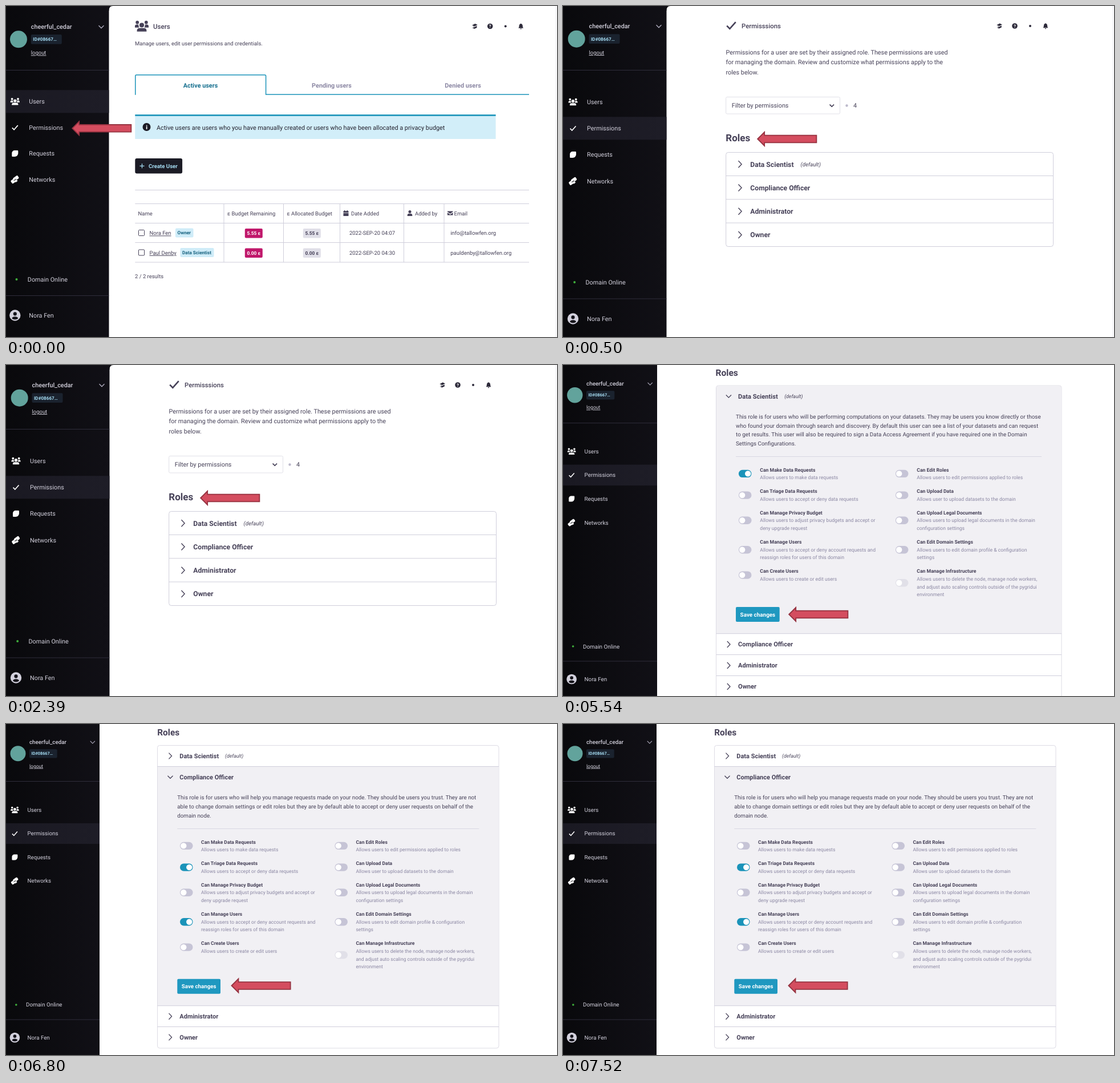
Animation of 966 by 580 pixels, one loop 8000 ms. Source, as an HTML page:

```html
<!DOCTYPE html>
<html lang="en">
<head>
<meta charset="utf-8">
<title>User permissions</title>
<style>
  html, body { margin: 0; width: 100%; height: 100%; overflow: hidden; background: #fff; }
  svg { display: block; width: 966px; height: 580px; }
  text { font-family: Roboto, sans-serif; text-rendering: geometricPrecision; white-space: pre; }
  .scene { visibility: hidden; animation: 8s step-end infinite; }
  #users { animation-name: users; }
  #roles { animation-name: roles; }
  #scientist { animation-name: scientist; }
  #officer { animation-name: officer; }
  @keyframes users { 0% { visibility: visible } 6.25%, 100% { visibility: hidden } }
  @keyframes roles { 0% { visibility: hidden } 6.25% { visibility: visible } 45.625%, 100% { visibility: hidden } }
  @keyframes scientist { 0% { visibility: hidden } 45.625% { visibility: visible } 85%, 100% { visibility: hidden } }
  @keyframes officer { 0% { visibility: hidden } 85%, 100% { visibility: visible } }
</style>
</head>
<body>
<svg viewBox="0 0 966 580">
  <defs>
    <linearGradient id="side"><stop stop-color="#09090c"/><stop offset="1" stop-color="#111016"/></linearGradient>
    <linearGradient id="row"><stop stop-color="#1a1922"/><stop offset="1" stop-color="#1e1d27"/></linearGradient>
  </defs>
  <g class="scene" id="users"></g>
  <g class="scene" id="roles"></g>
  <g class="scene" id="scientist"></g>
  <g class="scene" id="officer"></g>
</svg>
<script>
const INK = '#464158', DARK = '#2e2b3b', MUTED = '#8b87a3', LINE = '#cfcedb', BLUE = '#1a93b9', LIGHT = '#d3d1dd';
const PERSON = 'Nora Fen', HANDLE = 'cheerful_cedar';

// y is the middle of the capitals
const text = (x, y, size, str, { fill = INK, weight = 400, extra = '' } = {}) =>
  `<text x="${x}" y="${y + size * .355}" font-size="${size}" font-weight="${weight}" fill="${fill}" ${extra}>${str}</text>`;
const MID = 'text-anchor="middle"', UNDER = 'text-decoration="underline"', ITALIC = 'font-style="italic"';
const box = (x, y, w, h, fill, r = 0, extra = '') =>
  `<rect x="${x}" y="${y}" width="${w}" height="${h}" rx="${r}" fill="${fill}" ${extra}/>`;
const disc = (x, y, r, fill) => `<circle cx="${x}" cy="${y}" r="${r}" fill="${fill}"/>`;
const path = (d, stroke, width = 1) => `<path d="${d}" fill="none" stroke="${stroke}" stroke-width="${width}"/>`;
const hline = (x1, x2, y, stroke = LINE) => path(`M${x1} ${y}H${x2}`, stroke);
const at = (x, y, scale, body) => `<g transform="translate(${x} ${y}) scale(${scale})">${body}</g>`;

const shape = d => fill => `<path d="${d}" fill="${fill}"/>`;
const icons = {
  users: c => disc(0, -1.2, 2.7, c) + disc(-5.2, -4.4, 1.9, c) + disc(5.2, -4.4, 1.9, c) +
    shape('M-5.6 6.3V5A3 3 0 0 1-2.6 2.3H2.6A3 3 0 0 1 5.6 5V6.3ZM-8 1.6V0A2 2 0 0 1-6-1.8H-3.8Q-4.1.3-3 1.6ZM8 1.6V0A2 2 0 0 0 6-1.8H3.8Q4.1.3 3 1.6Z')(c),
  check: c => path('M-5 .4L-1.7 3.8L5-3.8', c, 1.7),
  leaf: shape('M-5.5 4.2V-.8A4.7 4.7 0 0 1-.8-5.5H4.2A1.3 1.3 0 0 1 5.5-4.2V-.5A6 6 0 0 1-.5 5.5H-4.2A1.3 1.3 0 0 1-5.5 4.2Z'),
  shake: c => `<g transform="rotate(-35)">${box(-8, -2.6, 7.5, 6.4, c, 1.8)}${box(-2.4, -4, 10, 6, c, 1.8)}${path('M-3 .4H2.2M0 3.2H4.5', '#0d0d11', 1)}${box(-2, 2, 4.5, 2.8, c, 1.2)}</g>`,
  cap: shape('M-4.6-1.8L.6-4.4L5-2.6L-.4.2ZM-4 .2L-.4 1.4L3.8-.8V2.4L-.6 4.4L-4.4 2.8L-1 2.6Z'),
  bell: shape('M-4.3 3.2C-3 2-3.2-.5-3-1.5C-2.6-3.6-1.2-4.2 0-4.8C1.2-4.2 2.6-3.6 3-1.5C3.2-.5 3 2 4.3 3.2ZM-1.3 3.9H1.3A1.3 1.3 0 0 1-1.3 3.9Z'),
  calendar: shape('M-4.5-1V-3.8H-3V-5H-1.6V-3.8H1.6V-5H3V-3.8H4.5V-1ZM-4.5-.3H4.5V5H-4.5Z'),
  person: c => disc(0, -2.4, 2.5, c) + shape('M-4.3 4.9V3.4A2.8 2.8 0 0 1-1.5.8H1.5A2.8 2.8 0 0 1 4.3 3.4V4.9Z')(c),
  mail: shape('M-4.8-3.6H4.8V-2.4L0 1.1L-4.8-2.4ZM-4.8-1.1L0 2.4L4.8-1.1V3.6H-4.8Z'),
};
const icon = (name, x, y, fill, scale = 1) => at(x, y, scale, icons[name](fill));
const chevron = (x, y, dir, scale = 1, stroke = INK, width = 1.4) =>
  at(x, y, scale, path(dir === 'down' ? 'M-5-2.5L0 2.5L5-2.5' : 'M-2.8-6L2.8 0L-2.8 6', stroke, width));
const arrow = (x, y) =>
  at(x, y, 1, '<path d="M1.2 0L13.2-12V-6.3H104.4V6.3H13.2V12Z" fill="#d44d5f" stroke="#963341" stroke-width="1.8"/>');

const NAV = [['users', 'Users'], ['check', 'Permissions'], ['leaf', 'Requests'], ['shake', 'Networks']];

function sidebar({ w, u, x, size, active, y }) {
  const [name, id, logout, rule, nav, step, online, rule2, foot] = y;
  const small = size * .875, left = x + 3.5;
  let s = box(0, 0, w, 580, 'url(#side)');
  s += disc(x - 18.3 * u, id, 15 * u, '#62a39c');
  s += text(left, name, size, HANDLE, { fill: LIGHT, weight: 500 });
  s += chevron(w - 13.5 * u, name + .5, 'down', .9 * u, '#b4b1c4');
  s += box(left, id - 8.4 * u, 54 * u, 16.8 * u, '#1a222e', 2);
  s += text(left + 3.5, id, size * .75, 'ID#08667…', { fill: '#a5dcf2', weight: 700 });
  s += text(left, logout, small, 'logout', { fill: LIGHT, extra: UNDER });
  s += hline(0, w, rule, '#2f2d3b');
  s += box(0, nav + active * step - 20 * u, w, 40 * u, 'url(#row)');
  NAV.forEach(([ico, label], i) => {
    const ny = nav + i * step;
    s += icon(ico, x - 24.5 * u, ny, '#fff', u) + text(x, ny, size, label, { fill: LIGHT });
  });
  s += disc(x - 21.8 * u, online, 2 * u, '#3fae3b') + text(x - 2.5, online, size, 'Domain Online', { fill: LIGHT });
  s += hline(0, w, rule2, '#2f2d3b');
  s += at(x - 24.5 * u, foot, u, disc(0, 0, 9.7, LIGHT) + disc(0, -2.6, 3.1, '#14131a') +
    shape('M-5.6 5.2Q-4.4 2.2 0 2.2T5.6 5.2Q3.4 7.6 0 7.6T-5.6 5.2Z')('#14131a'));
  return s + text(x, foot, size, PERSON, { fill: LIGHT });
}

const page = (w, rounded) => box(0, 0, 966, 580, '#fff') +
  (rounded ? shape(`M${w - 1} 0H${w + 7}Q${w} 0 ${w} 8H${w - 1}Z`)('#111016') + path('M964 0V580', '#eeedf2') : '');

const tools = (x, y) => icon('cap', x, y, DARK) + disc(x + 27, y, 4.8, DARK) +
  text(x + 27, y, 7.5, '?', { fill: '#fff', weight: 700, extra: MID }) +
  disc(x + 54, y, 2, DARK) + icon('bell', x + 81, y, DARK);

const tag = (x, y, w, label) => box(x, y - 8, w, 16, '#cfecf8', 2) +
  text(x + 3.6, y, 8.12, label, { fill: '#17627f', weight: 700 });
const pill = (x, y, label, bg, fill) => box(x - 15.5, y - 8, 31, 16.4, bg, 2) +
  text(x, y + .2, 8.4, label, { fill, weight: 700, extra: MID });

function usersScene() {
  const size = 10.83, s14 = 9.48, L = 226.3, R = 917;
  let s = page(180.5, true) + sidebar({
    w: 180.5, u: 1, x: 40.3, size: 10.8, active: 0,
    y: [36, 58.3, 82, 112.5, 167.3, 45.6, 479, 507.5, 542] });
  s += icon('users', 238, 35.3, INK, 1.5) + text(258, 36, 11.6, 'Users', { weight: 500 }) + tools(821.7, 35.5);
  s += text(226, 65.3, s14, 'Manage users, edit user permissions and credentials.');
  s += path(`M226.8 155.8V122.7Q226.8 120.7 228.8 120.7H453.6Q455.6 120.7 455.6 122.7V155H${R}`, BLUE, 1.5);
  ['Active', 'Pending', 'Denied'].forEach((t, i) =>
    s += text(341 + 230 * i, 139, size, t + ' users', { weight: 700, fill: i ? MUTED : '#17708f', extra: MID }));
  s += box(L, 190.2, 632.3, 42.8, '#d2eef9') + box(L, 190.2, 632.3, 2.6, BLUE);
  s += disc(246.5, 212, 7, '#1b1a24') + text(246.5, 212, 10, 'i', { fill: '#fff', weight: 900, extra: MID });
  s += text(264, 213, 10.85, 'Active users are users who you have manually created or users who have been allocated a privacy budget', { fill: '#23212d' });
  s += box(L, 267, 82.8, 26.5, '#1b1b25', 3) + path('M234.5 280.3H242.5M238.5 276.3V284.3', '#a5dcf2', 1.3);
  s += text(250, 280.5, 9.6, 'Create User', { fill: '#a5dcf2', weight: 700 });
  [322.5, 346.5, 380.5, 414.5, 449].forEach(y => s += hline(L, R, y));
  [382, 486.5, 585.5, 697.5, 768].forEach(x => s += path(`M${x} 346.5V449`, LINE));
  [[231.5, 'Name'], [388, 'ε Budget Remaining'], [492.5, 'ε Allocated Budget'], [605, 'Date Added'], [717, 'Added by'], [785.5, 'Email']]
    .forEach(([x, t]) => s += text(x, 363.5, s14, t));
  s += icon('calendar', 596, 363, INK) + icon('person', 708, 363, INK) + icon('mail', 778.7, 363, INK);
  const rows = [
    [398, PERSON, 297, 31.5, 'Owner', '5.55 ε', '04:07', 'info@tallowfen.org'],
    [432.5, 'Paul Denby', 305.5, 59, 'Data Scientist', '0.00 ε', '04:30', 'pauldenby@tallowfen.org'],
  ];
  for (const [y, who, tx, tw, role, eps, time, mail] of rows) {
    s += box(232.5, y - 5.5, 10, 10, '#fff', 1, `stroke="${INK}"`);
    s += text(251.5, y, s14, who, { extra: UNDER }) + tag(tx, y - .5, tw, role);
    s += pill(434.3, y, eps, '#c0186b', '#fff') + pill(536.3, y, eps, '#e0dfe8', INK);
    s += text(642, y, s14, '2022-SEP-20 ' + time, { extra: MID }) + text(779.3, y, s14, mail);
  }
  return s + text(226, 474, s14, '2 / 2 results') + arrow(115, 214.3);
}

const roleRow = (x, y, size, label, dir = 'right', u = 1) => chevron(x - 18 * u, y, dir, u) +
  text(x, y, size * 1.125, label, { weight: 700 }) +
  (label === 'Data Scientist' ? text(x + 88.2 * u, y, size * .89, '(default)', { extra: ITALIC }) : '');

function rolesScene() {
  const size = 10.82;
  let s = page(181.5, true) + sidebar({
    w: 181.5, u: 1, x: 42, size, active: 1,
    y: [35, 57.7, 81.7, 112.5, 168, 46.3, 484, 513, 548] });
  s += icon('check', 295, 34, INK, 1.55) + text(313, 35, 11.3, 'Permisssions', { weight: 500 }) + tools(765, 35);
  ['Permissions for a user are set by their assigned role. These permissions are used',
    'for managing the domain. Review and customize what permissions apply to the', 'roles below.']
    .forEach((t, i) => s += text(285.5, 81.2 + 17.35 * i, size, t));
  s += box(285.7, 159.5, 199.8, 29.5, '#fff', 2, 'stroke="#e1e0e8"');
  s += text(295.7, 174.5, size, 'Filter by permissions') + chevron(471.3, 174.5, 'down', .75, INK, 2.2);
  s += disc(497.5, 174.5, 2.2, '#bdbacc') + text(509, 174.5, size, '4');
  s += text(285.3, 231.2, 17, 'Roles', { weight: 700 });
  s += box(285.7, 256.5, 573.8, 165, '#fff', 4, `stroke="${LINE}"`);
  ['Data Scientist', 'Compliance Officer', 'Administrator', 'Owner'].forEach((t, i) => {
    if (i) s += hline(285.7, 859.5, 256.3 + 41.25 * i);
    s += roleRow(328.3, 277.3 + 41.2 * i, size, t);
  });
  return s + arrow(340, 233);
}

// title, description lines; left and right columns alternate
const RIGHTS = [
  ['Make Data Requests', 'Allows users to make data requests'],
  ['Edit Roles', 'Allows users to edit permissions applied to roles'],
  ['Triage Data Requests', 'Allows users to accept or deny data requests'],
  ['Upload Data', 'Allows user to upload datasets to the domain'],
  ['Manage Privacy Budget', 'Allows users to adjust privacy budgets and accept or', 'deny upgrade request'],
  ['Upload Legal Documents', 'Allows users to upload legal documents in the domain', 'configuration settings'],
  ['Manage Users', 'Allows users to accept or deny account requests and', 'reassign roles for users of this domain'],
  ['Edit Domain Settings', 'Allows users to edit domain profile &amp; configuration', 'settings'],
  ['Create Users', 'Allows users to create or edit users'],
  ['Manage Infrastructure', 'Allows users to delete the node, manage node workers,', 'and adjust auto scaling controls outside of the pygridui', 'environment'],
];
const ROW_Y = [0, 37.7, 75.1, 126.6, 177.7];

const toggle = (x, y, on, off) => box(x - 11.3, y - 6.7, 22.6, 13.4, on ? BLUE : off, 6.7) + disc(x + (on ? 5 : -5), y, 5.2, '#fff');

function rights(x, y, u, size, on) {
  const small = size * .875;
  return RIGHTS.map(([title, ...lines], i) => {
    const cx = x + (i % 2 ? 275 * u : 0), cy = y + ROW_Y[i >> 1];
    const off = title === 'Manage Infrastructure' ? '#e1e0e8' : '#c6c4d6';
    return toggle(cx + 16.2 * u, cy + 6.8 * lines.length, on.includes(i), off) +
      text(cx + 42.3 * u, cy, small, 'Can ' + title, { weight: 700 }) +
      lines.map((t, n) => text(cx + 42.3 * u, cy + 13.6 * (n + 1), small, t, { fill: MUTED })).join('');
  }).join('');
}

function detail({ x, top, u, size, para, rule, grid, on, save }) {
  let s = para.map((t, i) => text(x, top + 15.6 * i, size, t)).join('');
  s += hline(x, x + 536 * u, rule, '#d9d8e2') + rights(x, grid, u, size, on);
  s += box(x, save - 13, 76.7 * u, 26, '#1f98c0', 2);
  return s + text(x + 38.4 * u, save, size, 'Save changes', { fill: '#fff', weight: 700, extra: MID });
}

function scientistScene() {
  const size = 9.895;
  let s = page(165) + sidebar({
    w: 165, u: .913, x: 37.5, size, active: 1,
    y: [32.5, 52.8, 74.3, 101.7, 151.3, 41.6, 493, 519, 550.5] });
  s += text(267.5, 13.7, 15.6, 'Roles', { weight: 700 });
  s += box(268.5, 36, 605.5, 560, '#fff', 4, 'stroke="#dddce5"');
  s += shape('M269 470.5V40Q269 36.5 272.5 36.5H870Q873.5 36.5 873.5 40V470.5Z')('#f1f0f4');
  s += roleRow(307, 54.8, size, 'Data Scientist', 'down', .92);
  s += detail({
    x: 303, top: 90.7, u: 1, size, rule: 160.5, grid: 183.6, on: [0], save: 437,
    para: ['This role is for users who will be performing computations on your datasets. They may be users you know directly or those',
      'who found your domain through search and discovery. By default this user can see a list of your datasets and can request',
      'to get results. This user will also be required to sign a Data Access Agreement if you have required one in the Domain',
      'Settings Configurations.'] });
  ['Compliance Officer', 'Administrator', 'Owner'].forEach((t, i) =>
    s += hline(268.5, 874, 470.7 + 36.9 * i) + roleRow(307, 489.5 + 37 * i, size, t, 'right', .92));
  return s + arrow(395, 437);
}

function officerScene() {
  const size = 9.77;
  let s = page(164) + sidebar({
    w: 164, u: .902, x: 37.5, size, active: 1,
    y: [31.5, 51.8, 73.5, 100.5, 150.5, 41.5, 492, 518, 549.5] });
  s += text(265.3, 15, 15.4, 'Roles', { weight: 700 });
  s += box(265.5, 37.5, 598.5, 530.5, '#fff', 4, 'stroke="#dddce5"') + box(266, 74.5, 597.5, 419, '#f1f0f4');
  [74.5, 493.7, 530.5].forEach(y => s += hline(265.5, 864, y));
  s += roleRow(304.3, 56, size, 'Data Scientist', 'right', .905) + roleRow(304.3, 93, size, 'Compliance Officer', 'down', .905);
  s += detail({
    x: 300.3, top: 129, u: .987, size, rule: 183.5, grid: 206.6, on: [2, 6], save: 459.8,
    para: ['This role is for users who will help you manage requests made on your node. They should be users you trust. They are not',
      'able to change domain settings or edit roles but they are by default able to accept or deny user requests on behalf of the',
      'domain node.'] });
  s += roleRow(304.3, 512.3, size, 'Administrator', 'right', .905) + roleRow(304.3, 549, size, 'Owner', 'right', .905);
  return s + arrow(394.3, 458.5);
}

const scenes = { users: usersScene, roles: rolesScene, scientist: scientistScene, officer: officerScene };
for (const id in scenes) document.getElementById(id).innerHTML = scenes[id]();
</script>
</body>
</html>
```
